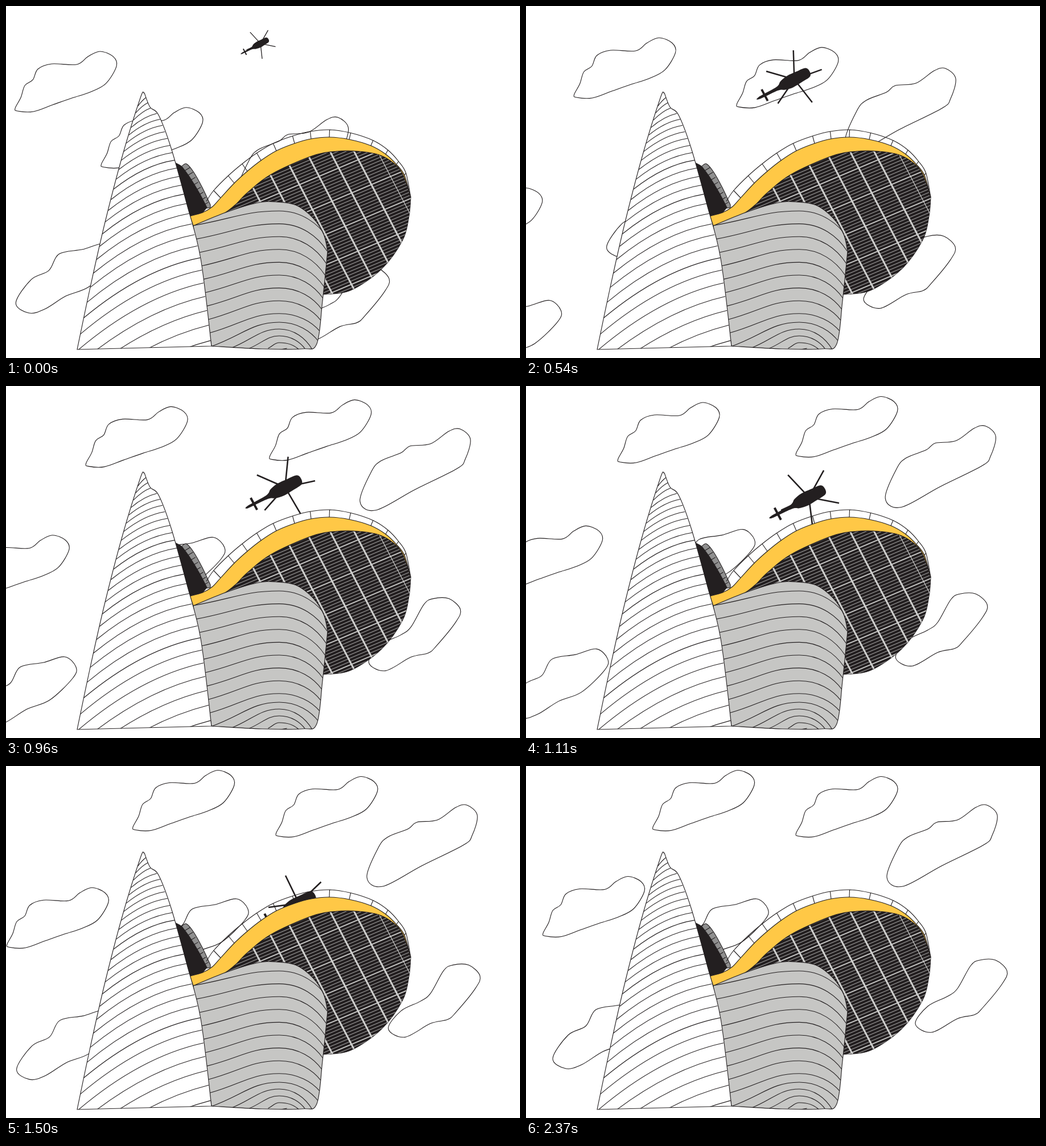
Write an HTML page with a canvas that moves like this. It is 903 by 620 pixels and loops after 2400 ms.

```html
<!DOCTYPE html>
<html lang="en">
<head>
<meta charset="utf-8">
<title>Clouds and helicopter</title>
<style>
html, body { margin: 0; width: 100%; height: 100%; overflow: hidden; background: #fff; }
canvas { display: block; }
</style>
</head>
<body>
<canvas id="stage" width="903" height="620"></canvas>
<script>
const ctx = document.getElementById('stage').getContext('2d');
const INK = '#231f20', YELLOW = '#ffc846', GRAY = '#c6c6c4', PALE = '#d0d0ce';
const LOOP = 2400, DEG = Math.PI / 180;

// "x,y x,y ..." to a list of points
const pts = text => text.trim().split(/\s+/).map(p => p.split(',').map(Number));

// Append a smooth curve through the points
function curve(path, p, closed = false, join = false) {
  const n = p.length;
  const get = i => closed ? p[(i + n) % n] : p[Math.max(0, Math.min(n - 1, i))];
  path[join ? 'lineTo' : 'moveTo'](...p[0]);
  for (let i = 0; i < (closed ? n : n - 1); i++) {
    const [a, b, c, d] = [get(i - 1), get(i), get(i + 1), get(i + 2)];
    path.bezierCurveTo(b[0] + (c[0] - a[0]) / 6, b[1] + (c[1] - a[1]) / 6,
      c[0] - (d[0] - b[0]) / 6, c[1] - (d[1] - b[1]) / 6, c[0], c[1]);
  }
  if (closed) path.closePath();
  return path;
}

// Closed shape made of several smooth sides
function outline(...sides) {
  const path = new Path2D();
  sides.forEach((side, i) => curve(path, side, false, i > 0));
  path.closePath();
  return path;
}

function line(path, from, to) {
  path.moveTo(...from);
  path.lineTo(...to);
}

// x on an edge at height y, extended past its ends
function edgeX(edge, y) {
  let i = 0;
  while (i < edge.length - 2 && edge[i + 1][1] < y) i++;
  const [[x1, y1], [x2, y2]] = [edge[i], edge[i + 1]];
  return x1 + (x2 - x1) * (y - y1) / (y2 - y1);
}

// ---- Clouds: each drifts from one place to another and settles ----
const blob = text => curve(new Path2D(), pts(text), true);
const puff = blob(`0,100 10,81 17,60 31,50 40,31 64,22 108,23 128,9 149,0 172,9 178,26
  159,57 131,72 100,82 66,94 32,106 4,105`);
const broad = blob(`0,127 20,75 37,56 72,42 88,30 124,26 156,4 176,0 194,18 185,53 170,70 96,107 28,143`);
const lumpy = blob(`0,104 27,63 58,47 76,18 117,10 154,0 174,18 168,38 128,76 88,92 51,115 23,122`);
const slim = blob(`0,113 22,82 56,65 74,51 97,11 113,1 141,1 161,20 153,42 119,84 104,97 74,104 29,128`);
const clouds = [
  { shape: puff, from: [16, 80], to: [223, 7.5], time: 1500, power: .9 },
  { shape: puff, from: [167, 179], to: [474.5, 18.5], time: 1100, power: 1.6 },
  { shape: puff, from: [-293, 421], to: [30, 194.5], time: 2130, power: 2 },
  { shape: broad, from: [407, 196.5], to: [634, 69], time: 1250, power: 2 },
  { shape: lumpy, from: [17, 419], to: [251, 234], time: 1500, power: 1.7 },
  { shape: lumpy, from: [-198, 576], to: [47, 411], time: 1800, power: 1.2 },
  { shape: slim, from: [512, 461], to: [684, 341], time: 2150, power: 2.2 }
];

function drawCloud({ shape, from, to, time, power }, t) {
  const left = Math.max(0, 1 - t / time) ** power;
  ctx.save();
  ctx.translate(to[0] + (from[0] - to[0]) * left, to[1] + (from[1] - to[1]) * left);
  ctx.stroke(shape);
  ctx.restore();
}

// ---- Helicopter: grows while it descends behind the roof ----
const heliBody = blob(`32,0 28,-9 10,-11 -9,-12 -24,-9 -36,-3 -74,-2 -74,2 -36,4 -24,9 -9,12 10,11 28,9`);

function drawHeli(t) {
  const size = Math.min(1, .5 + t / 1200);
  ctx.save();
  ctx.translate(447 + .045 * t, 66 + .117 * t);
  ctx.scale(size, size);
  ctx.lineWidth = 2.6;
  const blades = new Path2D();
  for (let k = 0; k < 5; k++) {
    const a = (228 - .325 * t + 72 * k) * DEG;
    line(blades, [0, 0], [54 * Math.cos(a), 54 * Math.sin(a)]);
  }
  ctx.stroke(blades);
  ctx.rotate(-28 * DEG);
  ctx.fillStyle = INK;
  ctx.fill(heliBody);
  ctx.fillRect(-64, -12, 4, 24);
  ctx.restore();
}

// ---- Tower with arched contour lines ----
const towerLeft = pts('242,153 236,162 205,262 173,385 147,500 125,605');
const towerRight = pts('243,153 253,178 268,192 290,250 318,350 342,445 361,599');
const tower = outline(towerRight, [...towerLeft].reverse());
const towerLines = new Path2D();
for (let y = 161; y < 598; y += 9 + (y - 161) * .045) {
  const yl = y + 13 + (y - 153) * .32;
  const xl = edgeX(towerLeft, yl), xr = edgeX(towerRight, y);
  towerLines.moveTo(xl, yl);
  towerLines.quadraticCurveTo((xl + xr) / 2, (y + yl) / 2 - .16 * (xr - xl), xr, y);
}

// ---- Roof and the truss that follows it ----
const roofTop = pts(`323,370 345,364 362,354 377,338 401,312 424,291 448,272 475,255 507,242 536,234
  568,231 603,235 641,246 667,261 686,279 700,298 711,337`);
const roofBottom = pts(`711,337 697,296 680,276 655,262 620,256 580,256 535,265 465,297 425,328 403,350
  385,364 360,376 329,387`);
const roof = outline(roofTop, roofBottom);
const trussTop = roofTop.slice(3).map(([x, y]) => {
  const k = Math.min(1, Math.sqrt((711 - x) / 140));
  return [x + k * (x - 560) / 15, y - k * 13];
});
const truss = curve(new Path2D(), [[352, 344], ...trussTop]);
trussTop.forEach((p, i) => line(truss, p, roofTop[i + 3]));

// ---- Dark panel under the roof ----
const panel = outline(roofBottom.slice(0, 11).reverse(),
  pts('711,337 708,370 697,412 660,463 605,501 556,508'));

function drawPanel() {
  ctx.strokeStyle = PALE;
  ctx.translate(550, 300);
  ctx.rotate(-27.5 * DEG);
  for (let i = -3; i < 4; i++) {
    ctx.fillStyle = PALE;
    ctx.fillRect(i * 37.4 - 1.5, -200, i < 3 ? 3 : 1.2, 500);
  }
  for (let i = -20; i < 55; i++) {
    const stripe = new Path2D();
    line(stripe, [-240, i * 5.5 - 19], [240, i * 5.5 + 19]);
    ctx.lineWidth = i % 9 ? .75 : 1.8;
    ctx.stroke(stripe);
  }
}

// ---- Gray annex with wave contours, nested arcs at the foot ----
const annex = outline(pts('329,387 385,364 440,347 475,345 510,351 540,374 558,402 565,432'),
  pts('565,432 556,520 546,595 520,604 450,604 361,599'));
const annexLines = new Path2D();
for (let i = 0; i < 14; i++) {
  const arc = Math.max(0, i - 9);
  const left = Math.min(603, 387 + 23.6 * i);
  const crest = i < 9 ? 361 + 22.6 * i : 557 + 12 * arc;
  const right = Math.min(605, 410 + 22 * i - .2 * i * i);
  const x1 = edgeX(towerRight, left) + 33 * arc, x2 = 566 - 1.8 * i - 10 * arc;
  annexLines.moveTo(x1, left);
  annexLines.bezierCurveTo(x1 + (480 - x1) * .45, left - (left - crest) * .45,
    480 - (480 - x1) * .4, crest, 480, crest);
  annexLines.bezierCurveTo(480 + (x2 - 480) * .45, crest,
    480 + (x2 - 480) * .8, crest + (right - crest) * .45, x2, right);
}

// ---- Dark sail and its ribbed fin behind the tower ----
const sailEdge = pts('297,276 310,284 325,305 340,330 353,355');
const sail = outline(sailEdge, pts('345,364 323,370'));
const fin = outline(pts('308,283 317,278 330,293 345,320 359,350'), pts('359,355 353,356'),
  sailEdge.slice(1).reverse());
for (let k = 0; k < 8; k++) line(fin, [314 + k * 5, 290 + k * 8.5], [324 + k * 4.5, 284 + k * 8.8]);

function paint(path, fill) {
  ctx.fillStyle = fill;
  ctx.fill(path);
  ctx.stroke(path);
}

function clipped(shape, draw) {
  ctx.save();
  ctx.clip(shape);
  draw();
  ctx.restore();
}

function drawBuilding() {
  paint(sail, INK);
  paint(fin, '#8f8f8f');
  ctx.stroke(truss);
  paint(panel, INK);
  clipped(panel, drawPanel);
  paint(roof, YELLOW);
  paint(annex, GRAY);
  clipped(annex, () => ctx.stroke(annexLines));
  paint(tower, '#fff');
  clipped(tower, () => ctx.stroke(towerLines));
}

function frame(now) {
  const t = now % LOOP;
  ctx.fillStyle = '#fff';
  ctx.fillRect(0, 0, 903, 620);
  ctx.strokeStyle = INK;
  ctx.lineWidth = 1.1;
  for (const cloud of clouds) drawCloud(cloud, t);
  if (t < 1700) drawHeli(t);
  drawBuilding();
  requestAnimationFrame(frame);
}
requestAnimationFrame(frame);
</script>
</body>
</html>
```
